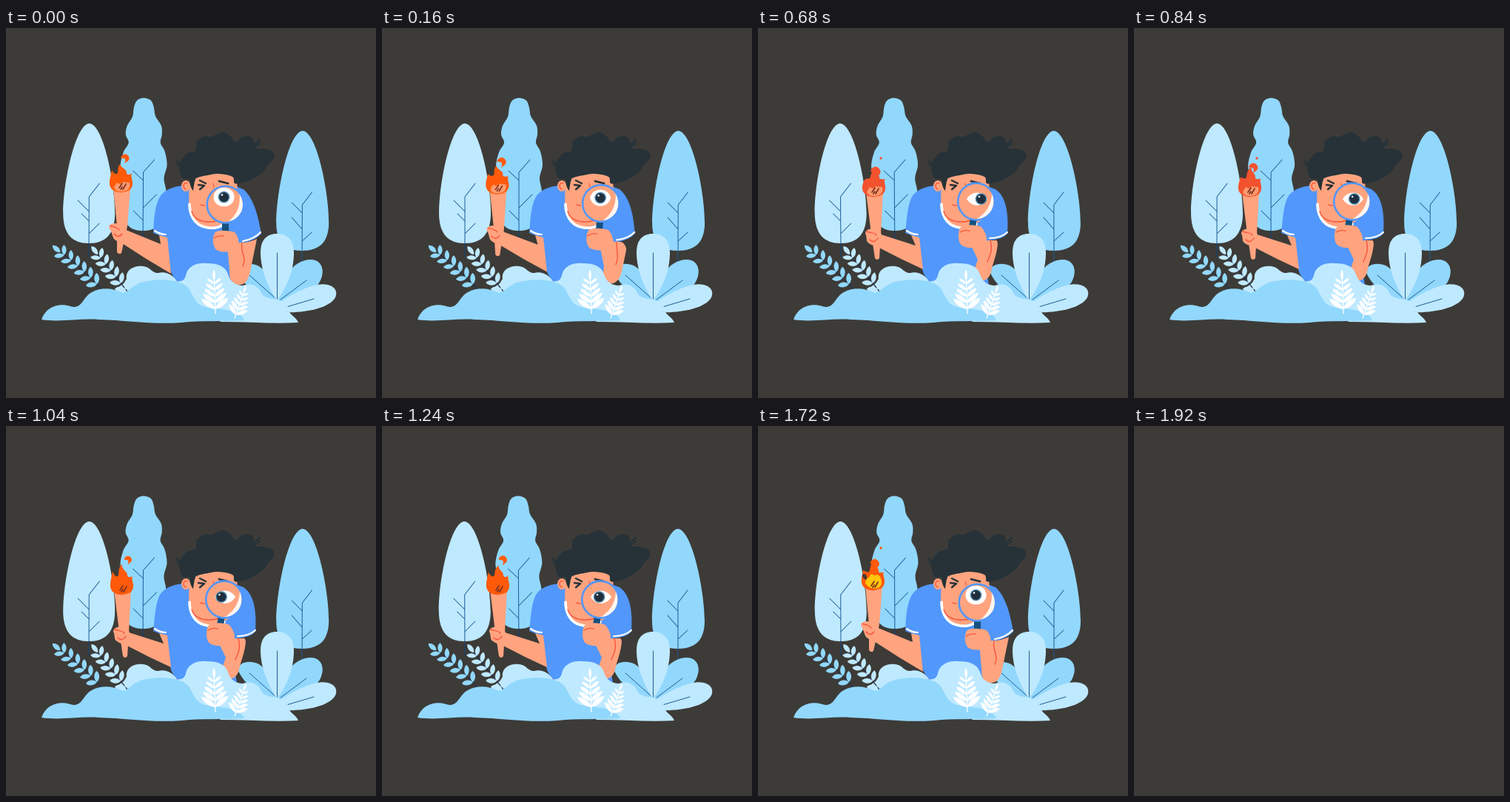
Recreate the animation shown at these times as an HTML page. Size 500 px wide and 500 px high, loop 1.96 s.

```html
<!DOCTYPE html>
<html lang="en">
<head>
<meta charset="utf-8">
<title>Explorer with torch</title>
<style>
html, body { margin: 0; width: 100%; height: 100%; overflow: hidden; background: #3d3b38; }
svg { display: block; width: 100%; height: 100%; }
</style>
</head>
<body>
<svg id="stage" viewBox="0 0 500 500"></svg>
<script>
const LOOP = 1960, BLANK_FROM = 1920;
const C = {
  pale: '#bfe9ff', sky: '#92d8fd', vein: '#1b5c96', navy: '#263350',
  skin: '#ffa47f', line: '#f8553a', shirt: '#5297fb', hair: '#263238', fire: '#ff5a0a', white: '#fff'
};
const stage = document.getElementById('stage');

// Markup helpers
const path = (d, fill, extra = '') => `<path d="${d}" fill="${fill}" ${extra}/>`;
const line = (d, color, width = 1, extra = '') =>
  `<path d="${d}" fill="none" stroke="${color}" stroke-width="${width}" stroke-linecap="round" stroke-linejoin="round" ${extra}/>`;
const group = (id, body) => `<g id="${id}">${body}</g>`;

// Closed smooth curve through points
function blob(text) {
  const p = text.split(' ').map(s => s.split(',').map(Number)), n = p.length;
  let d = `M${p[0]}`;
  for (let i = 0; i < n; i++) {
    const a = p[(i + n - 1) % n], b = p[i], c = p[(i + 1) % n], e = p[(i + 2) % n];
    d += `C${[0, 1].map(k => b[k] + (c[k] - a[k]) / 6)} ${[0, 1].map(k => c[k] - (e[k] - b[k]) / 6)} ${c}`;
  }
  return d + 'Z';
}

// Bowed stem with paired leaves, growing from (x0,y0) to (x1,y1)
function sprig({ from: [x0, y0], to: [x1, y1], bow = 0, pairs, size, fat, fill, stem, spread, taper }) {
  const dx = x1 - x0, dy = y1 - y0, len = Math.hypot(dx, dy);
  const angle = Math.atan2(dy, dx) * 180 / Math.PI;
  const at = u => {
    const off = 4 * bow * u * (1 - u) / len;
    return [x0 + dx * u + dy * off, y0 + dy * u - dx * off];
  };
  const leaf = (u, turn, s) => path(
    `M0 0C${s * .25} ${-s * fat} ${s * .75} ${-s * fat} ${s} 0C${s * .75} ${s * fat} ${s * .25} ${s * fat} 0 0Z`,
    fill, `transform="translate(${at(u)}) rotate(${angle + turn})"`);
  let out = line(`M${x0} ${y0}Q${x0 + dx / 2 + dy * 2 * bow / len} ${y0 + dy / 2 - dx * 2 * bow / len} ${x1} ${y1}`, stem, 1.3);
  for (let i = 0; i < pairs; i++) {
    const u = .12 + .8 * i / pairs, s = size * (1 - taper * i / pairs);
    out += leaf(u, spread, s) + leaf(u, -spread, s);
  }
  return out + leaf(.86, 0, size * (1 - taper * .7));
}
const leafy = { pairs: 6, size: 15, fat: .3, stem: C.navy, spread: 48, taper: .1 };
const fern = { fat: .2, fill: C.white, stem: C.white, spread: 52, taper: .6 };

const middleTree = blob('185,94.5 195,98 199,108 201,119 209,132 210,144 208,155 214,167 217,185 213,203 216,222 214,250 203,269 185,274 167,269 156,250 154,224 157,204 154,186 158,168 165,155 161,144 163,132 170,120 172,107 176,98');

stage.innerHTML = group('scene', [
  group('treeLeft',
    path('M112 129C130 129 147 206 147 250C147 279 134 291 112 291C90 291 77 279 77 250C77 206 94 129 112 129Z', C.pale) +
    line('M112 310V228L126 210M97 233L112 248M102 251L112 261M112 278L126 264', C.vein) +
    line('M112 291V310', C.navy)),
  group('treeMiddle',
    path(middleTree, C.sky) +
    line('M185 306V195L200 178M171 193L185 206M185 243L203 225M172 247L185 260', C.vein) +
    line('M185 274V306', C.navy)),
  group('treeRight',
    path('M400 139C419 140 436 222 436 263C436 290 423 301 400 301C377 301 365 290 365 263C365 222 381 140 400 139Z', C.sky) +
    line('M400 316V239L413 222M386 236L400 250M386 256L400 272M400 288L413 276', C.vein)),

  // Broad leaves
  path('M368 370C345 369 322 349 314 331C313 318 330 316 342 322C357 332 366 350 368 370Z', C.sky),
  line('M329 334L365 366', C.vein),
  path('M366 370C372 336 388 315 410 313C424 312 430 323 427 335C422 357 393 368 366 373Z', C.sky),
  path('M366 369C347 338 344 317 344 303C344 287 352 278 366 278C381 278 389 288 389 303C389 322 384 344 366 369Z', C.pale),
  path('M362 376C388 358 416 343 435 347C447 350 449 360 443 367C431 381 397 386 364 384Z', C.pale),
  line('M366.5 366V304M371 367L406 341M379 377L416 366', C.vein),

  // Man
  '<path id="torso" fill="' + C.shirt + '"/>',
  path('M248 190H312L313 244C307 262 290 267 273 270C257 267 249 256 247 240Z', C.skin),
  line('M248 238C248 253 255 266 269 269C280 272 289 269 295 265', C.white, 3.6),
  line('M251 248C254 258 263 262 275 262C282 262 288 260 291 257', C.line, 1.4),
  '<ellipse cx="243" cy="213.500" rx="6" ry="7.500" fill="' + C.skin + '"/>',
  line('M245 210C240 207 238 215 243 218', C.line, 1.4),
  path(blob('249,204 239,203 235,194 235,182 244,170 256,166 258,154 269,146 277,147 286,143 295,141 304,147 310,154 318,148 327,146 334,151 338,162 350,163 361,168 362,176 354,185 348,194 334,204 320,209 309,210 306,201 287,197 267,200 256,203'), C.hair),
  path('M246 198L258 200C254 207 254 214 253 220C249 216 248 208 246 198Z', C.hair),
  line('M330 156L333 149M335 158L343 151M336 161L343 156M235 183L230 179M236 187L231 184', C.hair, 2.4),
  line('M262 206L270 210M260 212L268 213L262 218', C.hair, 2.4),
  line('M263 239L268 240', C.line, 1.3),
  line('M288 207L300 210', C.hair, 2.8),
  line('M280 210L281 215', C.line, 1.2),
  line('M201 274Q208 279 216 279', C.white, 2.2),

  '<path id="foreArm" fill="' + C.skin + '"/>',
  '<path id="foreLine" fill="none" stroke="' + C.line + '" stroke-width="1.4" stroke-linecap="round"/>',
  '<path id="stripe" fill="none" stroke="#fff" stroke-width="2.2" stroke-linecap="round"/>',
  group('glass',
    path('M-4.500 25H4.500V43H-4.500Z', '#15507f') +
    `<circle r="24.800" fill="${C.skin}"/>` +
    path('M19 -15C29 2 22 22 3 24C15 15 21 2 19 -15Z', '#fff6f0') +
    `<circle r="24.800" fill="none" stroke="${C.shirt}" stroke-width="2.600"/>`),
  '<path id="eye" fill="#fff"/>',
  group('iris',
    '<circle r="7.800" fill="#4c87ad"/><circle r="6.300" fill="#202e3d"/><circle cx="-2.500" cy="-3" r="1.300" fill="#fff"/>'),
  '<path id="fist" fill="' + C.skin + '"/>',
  '<path id="fistLine" fill="none" stroke="' + C.line + '" stroke-width="1.3" stroke-linecap="round"/>',

  '<path id="backArm" fill="' + C.skin + '"/>',
  '<path id="torch" fill="' + C.skin + '"/>',
  group('fire',
    '<path id="flame"/><path id="curl"/><circle id="spark" r="1.700"/>' +
    path('M-11 -3C-10 -11 -6 -8 -4 -14C-1 -17 1 -11 4 -14C9 -15 14 -4 9 2C4 7 -7 5 -11 -3Z', '#ffc50a', 'id="core"') +
    path('M-15 -14C-11 -18 -8 -12 -9 -8C-12 -7 -15 -9 -15 -14Z', '#48382f', 'id="ember"') +
    path('M-10 0L-6 -6L-2 -4L2 -7L11 -6C13 1 8 6 0 6C-6 6 -9 4 -10 0Z', '#ff9b6e', 'id="mouth"') +
    line('M-3 1L1 -5M2 3L6 -4M-1 3L1 0', '#7d3021', 1.7)),
  '<path id="hand" fill="' + C.skin + '"/>',
  '<path id="handLine" fill="none" stroke="' + C.line + '" stroke-width="1.4" stroke-linecap="round"/>',

  // Bushes and small plants
  path('M144 365C147 347 159 350 163 339C161 327 173 320 186 322C195 323 198 332 206 331C216 328 228 335 232 344L242 366Z', C.pale),
  sprig({ ...leafy, from: [130, 354], to: [63, 296], bow: -3, fill: C.sky }),
  sprig({ ...leafy, from: [168, 361], to: [117, 297], fill: C.pale }),
  path('M222 346C230 339 240 347 243 334C246 321 258 317 272 318C286 318 297 322 300 333C303 343 311 348 320 348C332 344 341 348 346 360C352 369 379 363 383 382C383 388 392 390 395 398C362 400 328 397 290 397Z', C.pale),
  path('M48 394C54 376 72 371 87 376C103 381 103 364 116 357C126 351 143 350 158 358C169 355 171 345 191 342C211 338 242 340 249 355C255 366 257 376 275 378C296 380 318 383 322 395C292 397 264 395 238 398C198 401 163 395 126 394C99 392 72 398 48 394Z', C.sky),
  sprig({ ...fern, from: [283, 386], to: [281, 333], pairs: 5, size: 23 }),
  sprig({ ...fern, from: [309, 392], to: [323, 352], pairs: 5, size: 17 })
].join(''));

const el = id => document.getElementById(id);
const set = (id, attrs) => { for (const k in attrs) el(id).setAttribute(k, attrs[k]); };
const lerp = (a, b, p) => a + (b - a) * p;
const ramp = (t, from, to) => {
  const u = Math.min(1, Math.max(0, (t - from) / (to - from)));
  return u * u * (3 - 2 * u);
};

// Blend two paths that share the same commands
function blend(a, b, p) {
  const goal = b.match(/-?\d+(\.\d+)?/g);
  let i = 0;
  return a.replace(/-?\d+(\.\d+)?/g, n => lerp(+n, +goal[i++], p).toFixed(2));
}

// Interpolate rows of [time, ...values]
function track(rows, t) {
  let i = 0;
  while (i < rows.length - 2 && t >= rows[i + 1][0]) i++;
  const [a, b] = [rows[i], rows[i + 1]], p = ramp(t, a[0], b[0]);
  return a.slice(1).map((v, k) => lerp(v, b[k + 1], p));
}

// Each pair: arms open, arms drawn in
const poses = {
  torso: [
    'M248 212C230 213 215 217 208 228C200 242 200 262 199 277L217 284L222 326Q226 342 240 347L303 347L304 300L318 291Q336 288 345 278C342 262 337 232 321 218L300 210L250 230Z',
    'M248 212C230 213 215 217 208 228C201 242 201 262 199 277L217 284L222 326Q226 342 240 347L312 347L304 300L312 287Q330 286 337 278C338 262 339 230 321 218L300 210L250 230Z'],
  foreArm: [
    'M299 293L302 328C301 341 307 348 316 347C325 347 328 337 330 329L339 285Q328 290 319 290L308 290Z',
    'M286 290L297 313L291 330C288 338 299 343 306 342C313 339 315 329 317 321L329 284Q320 287 313 287L300 285Z'],
  foreLine: ['M319 291C316 304 326 309 320 322', 'M314 287C318 300 313 308 310 316'],
  stripe: ['M320 288Q336 285 344 276', 'M313 284Q328 284 337 276'],
  fist: [
    'M282 277C286 272 302 274 309 276C313 280 316 290 314 296C309 303 294 304 287 301C279 299 278 283 282 277Z',
    'M274 269C279 265 296 266 302 269C307 275 311 284 308 290C303 297 286 299 278 295C270 293 269 277 274 269Z'],
  fistLine: ['M281 284Q287 280 294 281', 'M273 276Q279 272 286 274'],
  backArm: [
    'M160 272L209 292L207 280L218 283L223 332Q190 313 157 291Z',
    'M166 279L213 294L207 280L218 283L223 326Q192 312 162 296Z'],
  torch: [
    'M145 216L168 216L164 268L156 304Q153 307 150 303L150 268Z',
    'M146 222L169 222L166 278L164 311Q161 315 158 311L153 278Z'],
  hand: [
    'M139 270C139 264 147 263 154 265C161 266 165 273 164 281C162 291 154 291 147 286C143 282 144 276 139 270Z',
    'M145 278C145 272 153 270 160 272C167 274 169 282 167 289C164 296 157 296 150 291C145 288 148 283 145 278Z'],
  handLine: ['M141 267C146 269 151 269 153 273M146 278Q152 285 157 278', 'M147 275C152 277 157 276 160 280M151 286Q157 292 162 284']
};

// time, left x y, middle x y, right x y, curl x y, curl size
const flameKeys = [
  [0, -13, -23, -2, -31, 14, -19, 5, -40, 1],
  [360, -14, -15, -2, -32, 15, -14, 6, -34, 1.2],
  [680, -13, -16, 4, -34, 15, -17, 2, -28, 1.2],
  [1040, -13, -25, -1, -35, 14, -18, 8, -41, .9],
  [1440, -14, -22, 2, -31, 14, -21, 5, -41, 1.1],
  [1720, -14, -20, 3, -37, 14, -18, 2, -30, 1.1],
  [1960, -13, -23, -2, -31, 14, -19, 5, -40, 1]
];
const gaze = [[0, 0], [420, 0], [600, 5.5], [760, 5.5], [960, -5], [1120, -5], [1360, 0], [1960, 0]];

function drawFire(t, p) {
  const [lx, ly, mx, my, rx, ry, cx, cy, size] = track(flameKeys, t);
  const red = t > 520 && t < 880, blazing = t > 1600;
  const color = red ? '#f2522e' : C.fire;
  set('fire', { transform: `translate(${lerp(156, 157, p)} ${lerp(215, 221, p)})` });
  set('flame', {
    fill: color,
    d: `M-10 5C-20 -1 -15 -12 ${lx} ${ly}C-10 -18 -8 -17 -6 -18C-3 -22 -7 -25 ${mx} ${my}` +
       `C0 -25 8 -25 7 -18C9 -16 12 -17 ${rx} ${ry}C11 -13 20 -4 11 4Q0 10 -10 5Z`
  });
  set('curl', {
    fill: color,
    d: 'M-6 1C-5 -5 2 -7 5 -1C7 4 2 6 -1 8C2 3 0 0 -6 1Z',
    transform: `translate(${cx} ${cy}) scale(${size})`
  });
  set('spark', {
    fill: color, cx: red ? 9 : 10, cy: blazing ? -50 : -45,
    opacity: red || blazing ? 1 : 0
  });
  set('core', { opacity: blazing ? 1 : 0 });
  set('ember', { opacity: blazing ? 1 : 0 });
  set('mouth', { opacity: t < 520 || red ? 1 : 0 });
}

function draw(t) {
  set('scene', { visibility: t >= BLANK_FROM ? 'hidden' : 'visible' });
  const wave = Math.cos(4 * Math.PI * t / LOOP);
  const sway = (id, base, height, shift) => {
    const k = shift / height;
    set(id, { transform: `matrix(1 0 ${-k} 1 ${k * base} 0)` });
  };
  sway('treeLeft', 310, 182, wave * 1.2 - .6);
  sway('treeMiddle', 306, 212, wave * 2 - 1);
  sway('treeRight', 316, 177, wave * .9);

  const p = ramp(t, 40, 320) * (1 - ramp(t, 1400, 1680));
  for (const id in poses) set(id, { d: blend(...poses[id], p) });

  const gx = lerp(296.5, 295, p), gy = lerp(238.5, 234.5, p);
  set('glass', { transform: `translate(${gx} ${gy}) rotate(${p * 9})` });
  const w = 14, h = lerp(17, 11.5, p), bend = lerp(14, 7, p);
  const ex = lerp(294.5, 296, p), ey = lerp(228.5, 231, p);
  set('eye', {
    d: `M${-w} 0C${-bend} ${-h} ${bend} ${-h} ${w} 0C${bend} ${h} ${-bend} ${h} ${-w} 0Z`,
    transform: `translate(${ex} ${ey})`
  });
  set('iris', { transform: `translate(${ex + track(gaze, t)[0]} ${ey})` });
  drawFire(t, p);
}

const start = performance.now();
function tick() {
  draw((performance.now() - start) % LOOP);
  requestAnimationFrame(tick);
}
tick();
</script>
</body>
</html>
```
